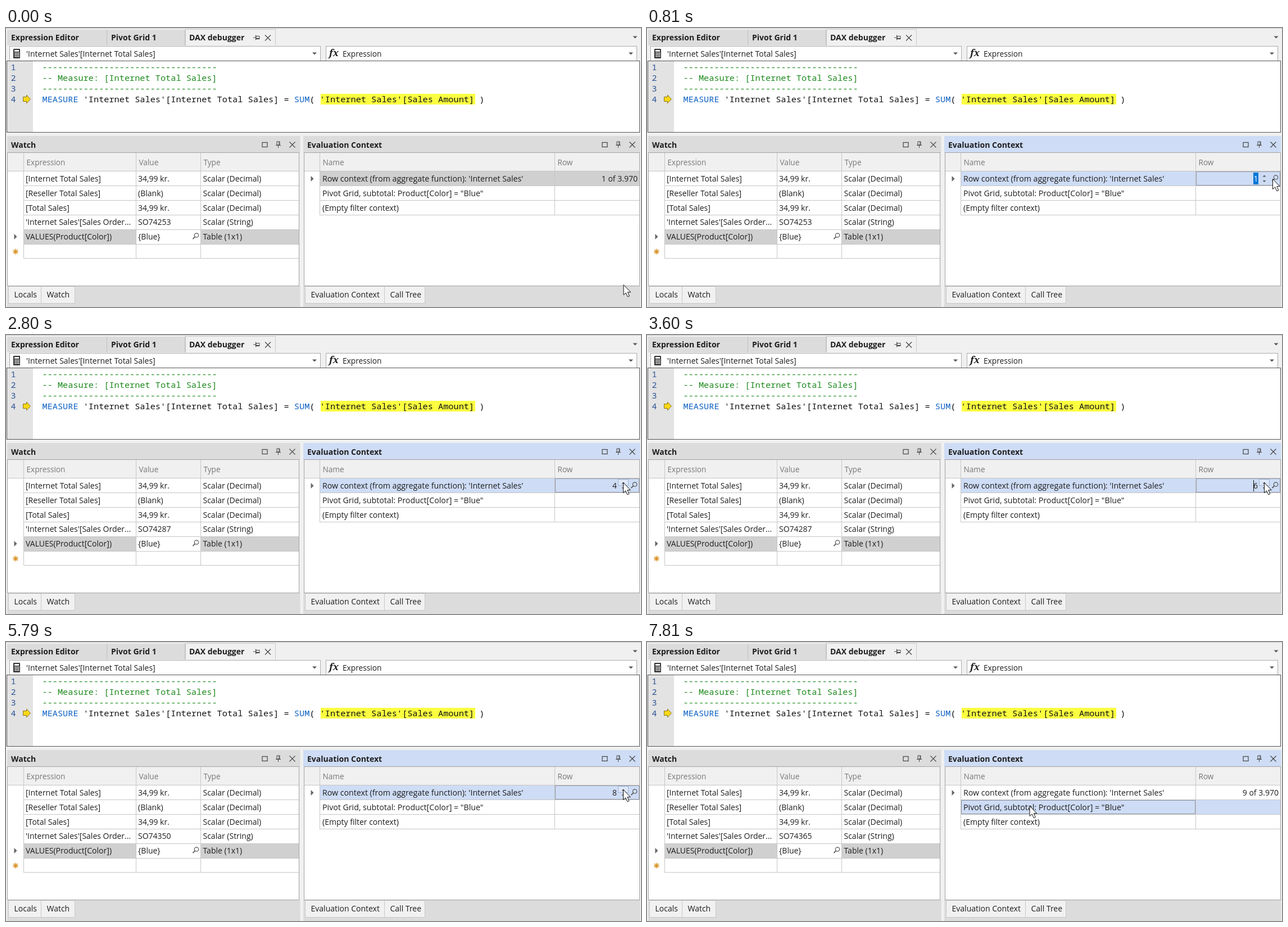
Animation of 1130 by 496 pixels, one loop 8000 ms. Source, as an HTML page:

```html
<!DOCTYPE html>
<html lang="en">
<head>
<meta charset="utf-8">
<title>DAX debugger</title>
<style>
html, body { margin: 0; width: 100%; height: 100%; overflow: hidden; background: #f0f0f0 }
svg { display: block; width: 1130px; height: 496px }
text { font: 14px "Open Sans", "Noto Sans", sans-serif; fill: #1e1e1e; white-space: pre }
.b { font-weight: 700 }
.h { font-size: 13.6px; fill: #777 }
.r { font-size: 14.2px }
.s { font-size: 13.7px }
.e { text-anchor: end }
.w { fill: #fff }
.m { font: 15.25px "Noto Sans Mono", "DejaVu Sans Mono", monospace; fill: #111 }
.n { fill: #2f5597 }
.c { fill: #1e8a1e }
.k { fill: #0f62c4 }
.fx { font: italic bold 17px "Noto Serif", serif }
</style>
</head>
<body>
<svg id="stage" viewBox="0 0 1130 496"></svg>
<script>
const LOOP = 8000, GRID = '#c6c6c6', GREY = '#d0d0d0', BLUE = '#cedcf5';
const stage = document.getElementById('stage');

// drawing helpers
const rect = (x, y, w, h, fill, stroke = 'none', more = '') =>
  `<rect x="${x}" y="${y}" width="${w}" height="${h}" fill="${fill}" stroke="${stroke}" ${more}/>`;
const path = (d, stroke = '#555', fill = 'none', more = '') =>
  `<path d="${d}" stroke="${stroke}" fill="${fill}" ${more}/>`;
const text = (x, y, s, cls = '') => `<text x="${x}" y="${y}" class="${cls}">${s}</text>`;
const frame = (x, y, w, h) =>
  rect(x + .5, y + .5, w - 1, h - 1, 'none', '#555', 'stroke-dasharray="1 1"');
const triangle = (x, y, w, h, fill = '#555') =>
  path(`M${x - w} ${y - h / 2}H${x + w}L${x} ${y + h / 2}Z`, 'none', fill);
const pointer = (x, y) => path(`M${x - 2.5} ${y - 5}L${x + 2.5} ${y}L${x - 2.5} ${y + 5}Z`, 'none', '#666');
const cross = (x, y) => path(`M${x - 5} ${y - 5}l10 10m0 -10l-10 10`, '#444', 'none', 'stroke-width="1.2"');
const lens = (x, y) => `<circle cx="${x}" cy="${y}" r="3.7" fill="none" stroke="#555" stroke-width="1.2"/>` +
  path(`M${x - 2.6} ${y + 2.6}l-4 4`, '#555', 'none', 'stroke-width="1.7"');
const pin = (x, y, turn = 0) => path('M-2.5 -5H2.5V1H-2.5ZM1.5 -5V1M-4.5 1.5H4.5M0 1.5V6', '#444', 'none',
  `transform="translate(${x} ${y}) rotate(${turn})"`);

function titleBar(x, w, label, fill) {
  const r = x + w;
  return rect(x, 192, w, 30, fill) + text(x + 7, 213, label, 'b') +
    rect(r - 67.5, 203.5, 9, 8, 'none', '#444', 'stroke-width="1.2"') +
    pin(r - 39, 207) + cross(r - 14, 207.5);
}

function grid(x, right, cols, labels, rows) {
  const end = 254.5 + rows * 25.9;
  let lines = `M${x} 254.5H${right}`;
  for (let i = 1; i <= rows; i++) lines += `M${cols[0]} ${Math.round(254 + i * 25.9) + .5}H${right}`;
  for (const c of cols) lines += `M${c + .5} 222V${end}`;
  return path(lines, GRID) + labels.map((s, i) => text(cols[i] + 5.5, 244, s, 'h')).join('') +
    rect(x + .5, 221.5, right - x, 237, 'none', '#a2a2a2');
}

const table = (x, right) => rect(x, 222, right - x, 237, '#fff') + rect(x, 222, right - x, 32, '#f0f0f0');

const bottomTab = (x, w, label) =>
  rect(x + .5, 459.5, w, 30, '#f1f1f1', '#c8c8c8') + text(x + 10.5, 479, label);

function topBars() {
  const combo = (x, w) => rect(x + .5, 32.5, w, 26, '#fff', '#ababab') + triangle(x + w - 10, 45.5, 4, 4);
  let keys = '';
  for (let i = 0; i < 9; i++) keys += rect(15.5 + i % 3 * 3, 43.5 + (i / 3 | 0) * 3, 2, 2, '#fff');
  return rect(0, 0, 1130, 31, '#f0f0f0') + rect(0, 0, 1130, 1, '#c9c9c9') +
    rect(2, 3, 178, 28, '#dcdcdc') + rect(180, 3, 138, 28, '#dcdcdc') +
    path('M179.5 3V31M318.5 3V31', '#c0c0c0') +
    rect(319.5, 2.5, 160, 30, '#f0f0f0', '#cacaca') + rect(0, 31, 1130, 28, '#f0f0f0') +
    text(9, 22, 'Expression Editor', 'b') + text(187, 22, 'Pivot Grid 1', 'b') +
    text(326, 22, 'DAX debugger', 'b') + pin(446, 17, 90) + cross(466, 17.5) +
    triangle(1119.5, 16.5, 4, 4) + combo(6, 553) + combo(569, 553) +
    rect(13, 37, 12, 17, '#333', 'none', 'rx="1"') + rect(15, 39, 8, 3, '#fff') + keys +
    text(36, 50.5, "'Internet Sales'[Internet Total Sales]") +
    text(575, 50, 'fx', 'fx') + text(599, 50.5, 'Expression', 's');
}

function editor() {
  const dashes = '-'.repeat(34), cw = 9.15, at = n => 64.5 + n * cw;
  const numbers = [1, 2, 3, 4].map(n => text(8.5, 55.5 + n * 19, n, 'm n')).join('');
  return rect(1.5, 58.5, 1126, 127, '#fff', '#555') + rect(2, 59, 46, 126, '#e3e3e3') + numbers +
    path('M30.5 122.5H36.5V119L43.5 126.5L36.5 134V130.5H30.5Z', '#8a7420', '#f7d817') +
    text(at(0), 74.5, dashes, 'm c') + text(at(0), 93.5, '-- Measure: [Internet Total Sales]', 'm c') +
    text(at(0), 112.5, dashes, 'm c') + rect(560, 117, 275, 19, '#fbff40') +
    text(at(0), 131.5, 'MEASURE', 'm k') +
    text(at(8), 131.5, "'Internet Sales'[Internet Total Sales] =", 'm') +
    text(at(49), 131.5, 'SUM', 'm k') + text(at(52), 131.5, '(', 'm') +
    text(at(54), 131.5, "'Internet Sales'[Sales Amount]", 'm') + text(at(85), 131.5, ')', 'm');
}

function watch(order) {
  const rows = [
    ['[Internet Total Sales]', '34,99 kr.', 'Scalar (Decimal)'],
    ['[Reseller Total Sales]', '(Blank)', 'Scalar (Decimal)'],
    ['[Total Sales]', '34,99 kr.', 'Scalar (Decimal)'],
    ["'Internet Sales'[Sales Order...", order, 'Scalar (String)'],
    ['VALUES(Product[Color])', '{Blue}', 'Table (1x1)']];
  let star = '';
  for (let a = 0; a < 8; a++) star += `M17 397.5l${5 * Math.cos(a * Math.PI / 4)} ${5 * Math.sin(a * Math.PI / 4)}`;
  return titleBar(2, 521.5, 'Watch', '#dcdcdc') + table(2, 522) +
    rect(31, 358, 491, 26, GREY) + rect(231, 358, 116, 26, '#fff') +
    grid(2, 521, [31, 231, 346], ['Expression', 'Value', 'Type'], 6) +
    rows.map((r, i) => r.map((s, j) => text([35, 235, 350.5][j], 273 + i * 25.8, s)).join('')).join('') +
    lens(339, 368.5) + pointer(17, 371) + path(star, '#d9952b', 'none', 'stroke-width="1.5"') +
    bottomTab(4, 58, 'Locals') + bottomTab(62, 60, 'Watch');
}

// timeline
const clicks = [[600, 810], [1670, 1740], [1940, 2060], [2260, 2330], [3260, 3340], [3530, 3600],
  [4400, 4480], [5260, 5330], [6190, 6270], [7610, 7810]];
const orders = [[0, 'SO74253'], [2730, 'SO74287'], [4000, 'SO74323'], [4930, 'SO74341'],
  [5790, 'SO74350'], [6720, 'SO74365']];
const carets = [[1670, 2800], [3260, 4070], [4400, 4930], [5260, 5790], [6190, 6720], [7250, 7690]];
const within = (list, t) => list.some(([a, b]) => t >= a && t < b);

// each move: start, end, number of steps, then points [step, x, y]
const moves = [
  [70, 400, 6, [[-1, 1098.5, 456], [1, 1103, 390], [3, 1111, 296], [5, 1113, 268]]],
  [1260, 1530, 5, [[-1, 1113, 268], [4, 1098, 262]]],
  [6720, 7480, 12, [[0, 1098, 262], [4, 914.5, 280], [8, 738, 289], [11, 680.5, 291]]]];

function cursorAt(t) {
  const [from, to, n, pts] = moves.filter((m, i) => !i || t >= m[0]).pop();
  const k = Math.max(-1, Math.min(n - 1, Math.floor((t - from) / (to - from) * (n - 1) + .1)));
  if (k <= pts[0][0]) return pts[0].slice(1);
  const i = pts.findIndex(p => p[0] >= k), a = pts[i - 1], b = pts[i];
  const u = (k - a[0]) / (b[0] - a[0]);
  return [a[1] + (b[1] - a[1]) * u, a[2] + (b[2] - a[2]) * u];
}

function context(t) {
  const opening = t >= 690 && t < 740, editing = t >= 740 && t < 7690, done = t >= 7690;
  const row = clicks.slice(1, -1).filter(c => t >= c[0]).length + 1;
  const hover = t >= 1450 && t < 6790;
  let out = titleBar(529, 599.5, 'Evaluation Context', t < 740 ? '#dcdcdc' : BLUE) + table(530, 1127) +
    rect(559, done ? 280 : 254, 568, 27, t < 740 ? GREY : BLUE) +
    grid(530, 1127, [558, 976], ['Name', 'Row'], 3) + pointer(545, 268) +
    text(563, 273, "Row context (from aggregate function): 'Internet Sales'", 'r') +
    text(563, 299, 'Pivot Grid, subtotal: Product[Color] = "Blue"', 'r') +
    text(563, 325, '(Empty filter context)');
  if (opening) out += rect(980, 257, 118, 22, BLUE) + text(1124, 273, '3.970', 'e');
  else if (!editing) out += text(1124, 273, row + ' of 3.970', 'e');
  if (editing) {
    out += frame(977, 255, 150, 25);
    if (hover) out += rect(1089.5, 256.5, 18, 11, '#dde7f8', '#a3b5d6');
    out += triangle(1098.5, 263, 3, -3) + triangle(1098.5, 272.5, 3, 3) + lens(1119, 265.5);
    if (row > 1) out += text(1087, 273, row, 'e');
    if (within(carets, t)) out += rect(1079, 258, 1, 20, '#111');
  }
  if (opening || editing && row == 1) out += rect(1079, 257, 9, 21, '#0078d7') + text(1087.5, 273, '1', 'e w');
  if (done) out += frame(559, 281, 417, 25);
  return out + bottomTab(532, 141, 'Evaluation Context') + bottomTab(673, 72, 'Call Tree');
}

function cursor(t) {
  const [x, y] = cursorAt(t);
  const glow = within(clicks, t) ? `<circle cx="${x}" cy="${y}" r="15" fill="#ffee00" opacity=".65"/>` : '';
  return glow + path('M.5 .5V18.6L4.6 14.8L7.8 21.8L10.8 20.5L7.8 13.7H13.2Z', '#111', '#fff',
    `transform="translate(${x} ${y})"`);
}

const base = rect(0, 0, 1130, 496, '#f0f0f0') + topBars() + editor() +
  rect(2, 458, 521.5, 38, '#dcdcdc') + rect(529, 458, 599.5, 38, '#dcdcdc');
let shown = '';

function draw(now) {
  const t = now % LOOP;
  const order = orders.filter(o => t >= o[0]).pop()[1];
  const scene = base + watch(order) + context(t) + cursor(t);
  if (scene !== shown) stage.innerHTML = shown = scene;
}

const start = performance.now();
function tick() {
  draw(performance.now() - start);
  requestAnimationFrame(tick);
}
tick();
</script>
</body>
</html>
```
